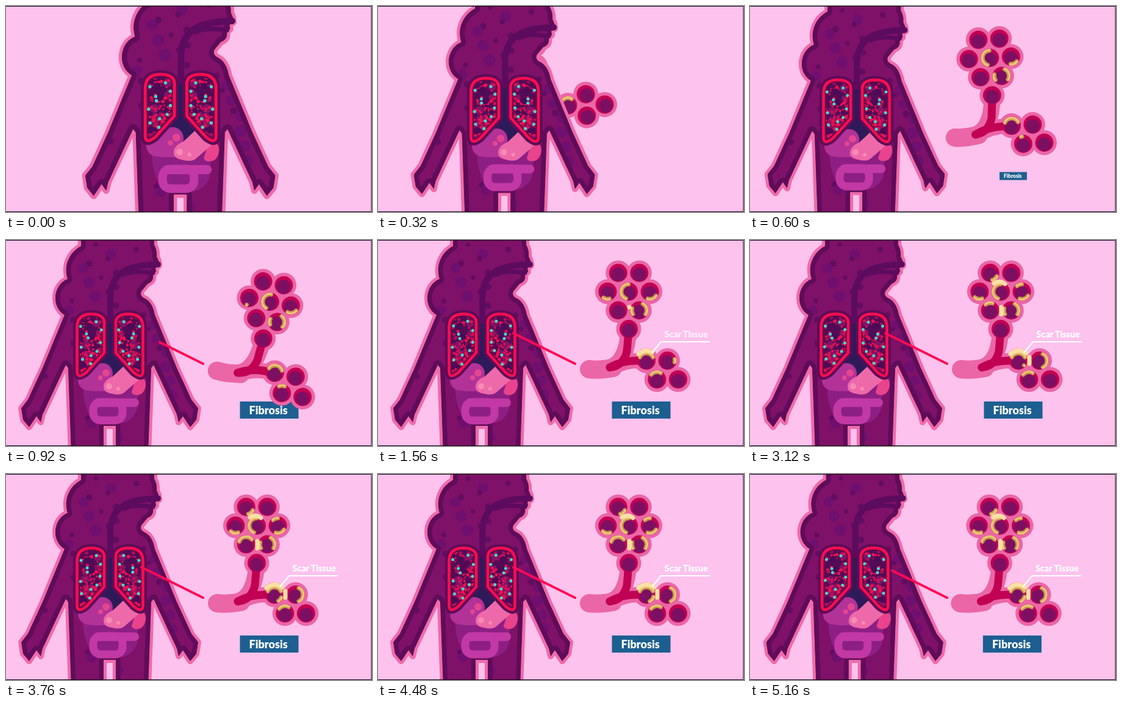
An HTML page that plays this animation: 600 px wide and 338 px high, repeating every 5200 ms.

```html
<!DOCTYPE html>
<html lang="en">
<head>
<meta charset="utf-8">
<title>Fibrosis</title>
<style>
  html, body { margin: 0; width: 100%; height: 100%; overflow: hidden; background: #fdc2ee; }
  svg { display: block; width: 100vw; height: 100vh; fill: none; }
  text { font-family: Lato, Inter, sans-serif; font-weight: 900; fill: #fff; }
  .round { stroke-linecap: round; stroke-linejoin: round; }
</style>
</head>
<body>
<svg viewBox="0 0 600 338" preserveAspectRatio="none">
  <defs>
    <path id="skin"/>
    <path id="lungShape" d="M116.500 143Q116.500 121.500 140 121.500T161 140V185L132 217Q117 229 116.500 216Z"/>
    <clipPath id="skinClip"><use href="#skin"/></clipPath>
    <clipPath id="lungClip"><use href="#lungShape"/></clipPath>
  </defs>

  <rect width="600" height="338" fill="#fdc2ee"/>

  <g id="label">
    <rect x="383.500" y="265" width="96" height="28" fill="#1c5f90"/>
    <text x="398.500" y="285.500" font-size="18">Fibrosis</text>
  </g>

  <g id="tree">
    <g class="round" stroke="#eb66a7">
      <path d="M346 212Q362 214 385 210" stroke-width="30"/>
      <path d="M377 210Q408 204 411 146" stroke-width="27"/>
      <path d="M385 209Q410 195 440 199" stroke-width="25"/>
    </g>
    <g id="halos" fill="#eb66a7"></g>
    <g class="round" stroke="#c10053" stroke-width="13">
      <path d="M380 209Q402 207 408 183L411 148"/>
      <path d="M380 209Q405 195 438 199"/>
    </g>
    <g id="cells"></g>
    <g id="scars" class="round"></g>
    <g id="bridges" class="round" stroke="#fbe0a5" stroke-width="7"></g>
  </g>

  <g id="body">
    <use href="#skin" stroke="#f06aaa" stroke-width="10" stroke-linejoin="round"/>
    <g clip-path="url(#skinClip)">
      <use href="#skin" fill="#7f1169"/>
      <g id="spots"></g>
      <use href="#skin" stroke="#5f0c59" stroke-width="15" stroke-linejoin="round"/>
    </g>
    <g class="round" stroke="#5c0b5e" stroke-width="10">
      <path d="M249 40Q213 41 197 49Q171 62 171 95V140"/>
      <path d="M241 54Q209 49 193 57" stroke-width="7"/>
    </g>
    <path d="M165 137H177V180L196 214L170 224L147 208L165 181Z" fill="#2e1a58"/>

    <path d="M126 234H216V270Q214 293 192 300H150Q126 284 126 234" fill="#8d1f84"/>
    <g fill="#b23298">
      <circle cx="135" cy="230" r="17"/><circle cx="158" cy="219" r="17"/>
      <rect x="130" y="222" width="48" height="26" rx="12"/>
    </g>
    <g class="round" stroke="#c238a4">
      <path d="M150 267H211" stroke-width="14"/>
      <rect x="143" y="266" width="48" height="30" rx="12" stroke-width="13"/>
    </g>
    <path d="M204 207Q222 201 227 222L215 232L192 215Z" fill="#66115f"/>
    <path d="M213 226Q230 222 229 239Q226 257 210 254Q204 251 207 246Z" fill="#e8438c"/>
    <path d="M160 241Q160 230 175 224L194 206Q207 216 217 230L194 250Q187 256 173 252Q160 250 160 241Z"
      fill="#ee69a9"/>
    <g fill="#f68bb3">
      <circle cx="169" cy="240" r="5"/><circle cx="184" cy="244" r="3"/>
    </g>
    <g fill="#e44591">
      <circle cx="164" cy="218" r="6"/><circle cx="155" cy="226" r="4"/>
    </g>

    <g id="lung">
      <use href="#lungShape" stroke="#5d0c58" stroke-width="13" stroke-linejoin="round"/>
      <use href="#lungShape" fill="#540b56"/>
      <g clip-path="url(#lungClip)">
        <g id="tissue"></g>
        <use href="#lungShape" stroke="#650a4f" stroke-width="9"/>
      </g>
      <use href="#lungShape" stroke="#ff0d50" stroke-width="4.500" stroke-linejoin="round"/>
      <g id="air"></g>
    </g>
    <use href="#lung" transform="translate(341 0) scale(-1 1)"/>
  </g>

  <path id="pointer" class="round" stroke="#ff0a54" stroke-width="4"/>
  <g id="note">
    <path id="leader" d="M449 185L464 167H544" pathLength="1" stroke="#fff" stroke-width="2.200"/>
    <text id="noteText" x="469.500" y="159.500" font-size="14.300">Scar Tissue</text>
  </g>

  <path d="M0 .5H599V337.500H0" stroke="#12060f"/>
</svg>

<script>
const LOOP = 5200;
const $ = id => document.getElementById(id);
const clamp = x => Math.max(0, Math.min(1, x));
const span = (t, a, b) => clamp((t - a) / (b - a));
const mix = (a, b, p) => a + (b - a) * p;
const easeOut = p => 1 - (1 - p) ** 2;
const smooth = p => p * p * (3 - 2 * p);
const show = (el, on) => { el.style.display = on ? '' : 'none'; };

function add(parent, tag, attrs) {
  const el = document.createElementNS('http://www.w3.org/2000/svg', tag);
  for (const k in attrs) el.setAttribute(k, attrs[k]);
  return $(parent).appendChild(el);
}
const dot = (parent, cx, cy, r, fill) => add(parent, 'circle', fill ? { cx, cy, r, fill } : { cx, cy, r });

let seed = 11;
const rnd = () => (seed = (seed * 16807) % 2147483647) / 2147483647;
const between = (a, b) => mix(a, b, rnd());

// Body outline: one side from shoulder to crotch, mirrored for the other
const side = [[96, 123], [60, 210], [36, 262], [25, 276], [28, 295], [38, 307], [50, 289],
  [57, 299], [60, 286], [98, 205], [102, 210], [107, 350], [160, 350], [160, 305]];
const mirrored = side.map(([x, y]) => [340 - x, y]).reverse();
$('skin').setAttribute('d', `M123-12V10C104 20 94 42 101 64C79 72 72 108 96 123
  L${side.concat(mirrored).join('L')}Q240 101 226 95Q219 91 222 84L232 72Q243 68 241 57
  L246 52L245 46L251 42L250 34L247 27Q248 17 243 8V-12Z`);

for (let i = 0; i < 44; i++) {
  const y = i * 7.7, reach = mix(60, 120, clamp((y - 90) / 170));
  const big = i % 3 === 0;
  dot('spots', 170 + between(-reach, reach), y, big ? between(7, 10) : between(3.5, 6),
    big ? '#6f0f70' : '#620d5f');
}

// Alveoli sit on a hexagonal lattice
const gap = 34.6, rise = 30.7;
const cells = [];
[2, 3, 2, 1].forEach((n, row) => {
  for (let i = 0; i < n; i++) cells.push([411 + (i - (n - 1) / 2) * gap, 54 + row * rise]);
});
for (let i = 0; i < 4; i++) {
  const row = i >> 1;
  cells.push([440 + (i % 2) * gap + row * gap / 2, 198 + row * rise]);
}
for (const [x, y] of cells) {
  dot('halos', x, y, 20.5);
  dot('cells', x, y, 15, '#c10053');
  dot('cells', x, y + 2.5, 11.3, '#7d0f63');
}

// Cell, direction and half width in degrees, in order of growth
const scars = [[3, 190, 80], [8, -90, 64], [6, -15, 48], [6, 172, 24], [4, 70, 38], [10, -100, 42],
  [2, 100, 32], [9, 0, 65], [4, 250, 22], [0, 50, 25], [5, -100, 60], [8, 40, 25]
].map(([cell, dir, half], i) => ({
  cell: cells[cell], dir, half, from: 450 * i - 1900,
  under: add('scars', 'path', { stroke: '#c9964f', 'stroke-width': 6 }),
  over: add('scars', 'path', { stroke: '#ecc575', 'stroke-width': 3.5 })
}));

function arc([x, y], r, dir, half) {
  const at = deg => {
    const a = deg * Math.PI / 180;
    return `${x + r * Math.cos(a)} ${y + r * Math.sin(a)}`;
  };
  return `M${at(dir - half)}A${r} ${r} 0 0 1 ${at(dir + half)}`;
}

const bridges = ['M427 187Q439 176 453 186', 'M412 110V122', 'M458 192V203', 'M400 71Q410 65 418 72']
  .map((d, i) => ({ from: 1100 + 400 * i, el: add('bridges', 'path', { d, pathLength: 1 }) }));

// Lung contents: seeded specks that drift a little
const movers = [];
function mover(parent, x, y, r, fill, sway) {
  movers.push({ el: dot(parent, x, y, r, fill), phase: rnd() * 6.28, sway });
}
const lungX = (y, p) => mix(122, 157 - Math.max(0, y - 184), p);
function specks(n, small, large, fill, sway) {
  for (let i = 0; i < n; i++) {
    const y = between(127, 214);
    mover('tissue', lungX(y, rnd()), y, between(small, large), fill, sway);
  }
}
specks(12, 3, 7, '#841367', 1);
specks(30, 1.2, 2.8, '#b00d55', 1.8);
specks(75, 1.2, 2.8, '#ee104f', 1.8);
specks(6, 3, 6, '#4c0a57', 1);
for (let i = 0; i < 11; i++) {
  const y = 134 + 6.9 * i;
  mover('air', lungX(y, .5 + .5 * Math.sin(2.65 + 2.4 * i)), y, 2.5, '#45dccb', .8);
}

// Monotone curve through [time, value] keys
function track(...keys) {
  const rate = i => (keys[i + 1][1] - keys[i][1]) / (keys[i + 1][0] - keys[i][0]);
  const slopes = keys.map((k, i) => {
    if (i === 0) return rate(0);
    if (i === keys.length - 1) return 0;
    const a = rate(i - 1), b = rate(i);
    return a * b > 0 ? 2 * a * b / (a + b) : 0;
  });
  return t => {
    let i = 0;
    while (i < keys.length - 2 && t > keys[i + 1][0]) i++;
    const h = keys[i + 1][0] - keys[i][0], u = clamp((t - keys[i][0]) / h), v = 1 - u;
    return v * v * (1 + 2 * u) * keys[i][1] + u * u * (3 - 2 * u) * keys[i + 1][1]
      + h * u * v * (v * slopes[i] - u * slopes[i + 1]);
  };
}
const turn = track([0, -70], [320, -32], [560, -6], [920, 10.5], [1300, 0]);
const tipX = track([0, 286], [320, 227], [560, 317], [760, 332]);
const tipY = track([0, 240], [320, 232], [760, 212]);

function draw(t) {
  const out = span(t, 4700, 5160) ** 3;
  const away = 1 - easeOut(span(t, 0, 740)) + .015 * out;
  const shift = -1.6 * out;

  $('body').setAttribute('transform',
    `translate(${103.3 * away} ${-18.5 * away}) scale(${1 + .075 * away})`);

  const size = smooth(span(t, 0, 290));
  $('tree').setAttribute('transform',
    `translate(${tipX(t) + shift} ${tipY(t)}) rotate(${turn(t)}) scale(${size}) translate(-332 -212)`);

  for (const { cell, dir, half, from, under, over } of scars) {
    const now = half * smooth(span(t, from, from + 1050));
    show(under, now > 0);
    show(over, now > 0);
    under.setAttribute('d', arc(cell, 11.7, dir, now));
    over.setAttribute('d', arc(cell, 13, dir, now));
  }
  for (const { el, from } of bridges) {
    const p = smooth(span(t, from, from + 600));
    show(el, p > 0);
    el.setAttribute('stroke-dasharray', `${p} 2`);
  }

  const pop = easeOut(span(t, 520, 820));
  $('label').setAttribute('transform',
    `translate(${431.5 + shift} 279) scale(${pop}) translate(-431.5 -279)`);

  const reach = easeOut(span(t, 720, 1160)) - .11 * out;
  show($('pointer'), reach > 0);
  $('pointer').setAttribute('d', `M323 203L${mix(323, 222, reach)} ${mix(203, 153, reach)}`);

  const lead = smooth(span(t, 1160, 1520));
  $('note').setAttribute('transform', `translate(${shift} 0)`);
  show($('leader'), lead > 0);
  $('leader').setAttribute('stroke-dasharray', `${lead} 2`);
  $('noteText').setAttribute('opacity', span(t, 1320, 1640));

  const w = t / LOOP * Math.PI * 2;
  for (const { el, phase, sway } of movers)
    el.setAttribute('transform',
      `translate(${sway * Math.sin(3 * w + phase)} ${sway * Math.cos(2 * w + phase * 2)})`);
}

const start = performance.now();
function tick() {
  draw((performance.now() - start) % LOOP);
  requestAnimationFrame(tick);
}
tick();
</script>
</body>
</html>
```
